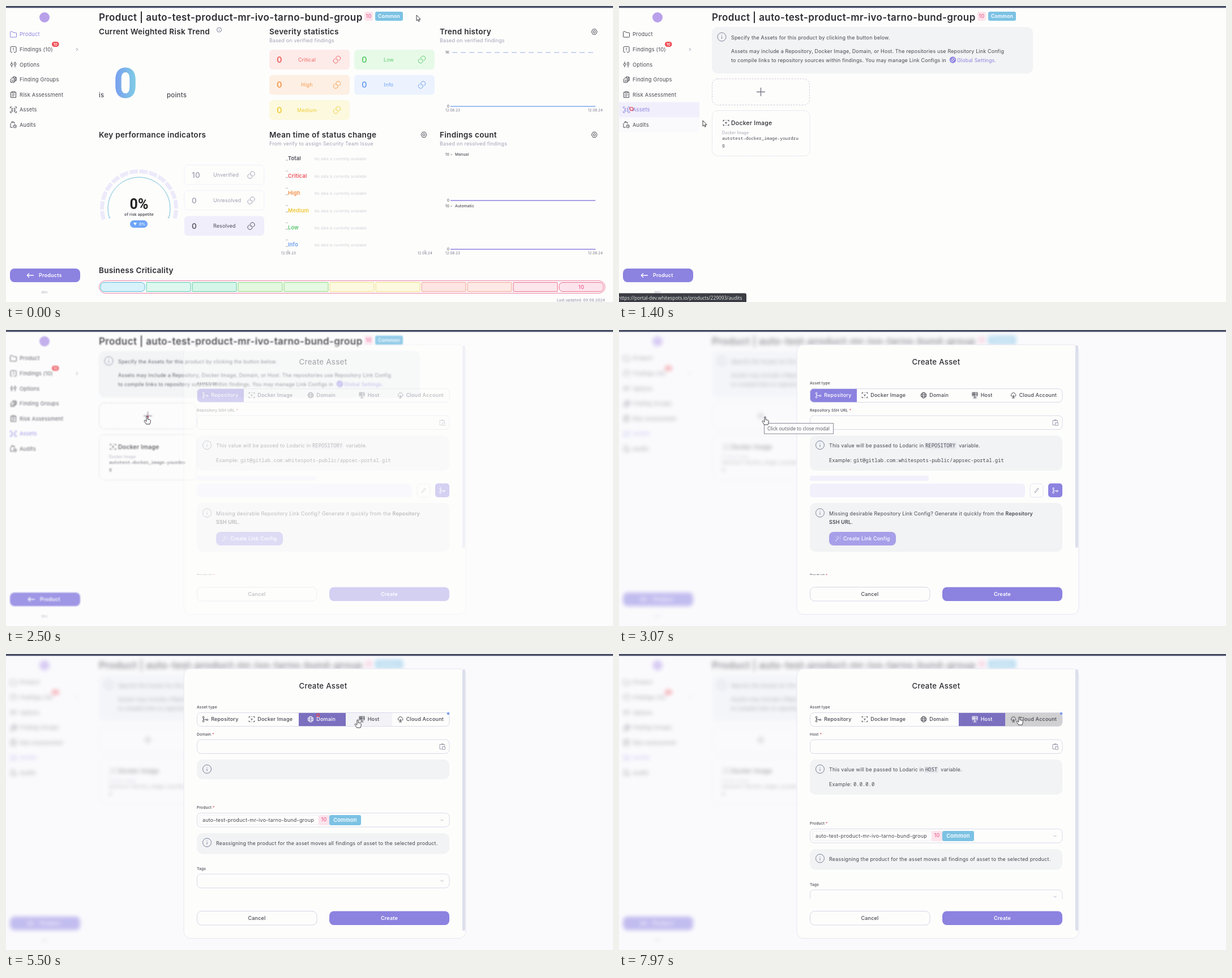
An HTML page that plays this animation: 1072 by 522 pixels, repeating every 8 s.

```html
<!DOCTYPE html>
<html lang="en">
<head>
<meta charset="utf-8">
<title>Create asset</title>
<style>
html, body { margin: 0; width: 100%; height: 100%; overflow: hidden; background: #fdfdfc; }
svg { display: block; }
text { font-family: Inter, sans-serif; letter-spacing: .023em; }
.mono { font-family: "Noto Sans Mono", monospace; letter-spacing: 0; }
.sys { font-family: "Open Sans", sans-serif; letter-spacing: 0; }
.num { font-family: Roboto, sans-serif; letter-spacing: 0; }
</style>
</head>
<body>
<svg id="stage" width="1072" height="522" viewBox="0 0 1072 522"></svg>
<script>
const PURPLE = '#8c82e0', DEEP = '#7a70bf', INK = '#484852', DARK = '#2c2c32', MUTED = '#a2a2b6', PANEL = '#f1f3f4';
const PRODUCT = 'auto-test-product-mr-ivo-tarno-bund-group';

// y is the middle of the capitals
function text(x, y, str, size, { fill = INK, weight = 400, anchor = 'start', cls = '' } = {}) {
  return `<text x="${x}" y="${y + size * 0.36}" font-size="${size}" font-weight="${weight}" text-anchor="${anchor}" class="${cls}" fill="${fill}">${str}</text>`;
}
function box(x, y, w, h, r, fill = 'none', stroke = 'none', extra = '') {
  return `<rect x="${x}" y="${y}" width="${w}" height="${h}" rx="${r}" fill="${fill}" stroke="${stroke}" ${extra}/>`;
}
function line(x1, y1, x2, y2, stroke, width = 1, extra = '') {
  return `<path d="M${x1} ${y1}L${x2} ${y2}" fill="none" stroke="${stroke}" stroke-width="${width}" ${extra}/>`;
}
const dot = (x, y, r, fill) => `<circle cx="${x}" cy="${y}" r="${r}" fill="${fill}"/>`;
const mid = (x, y, str, size, o = {}) => text(x, y, str, size, { ...o, anchor: 'middle' });
const heading = (x, y, str) => text(x, y, str, 13.5, { weight: 600, fill: DARK });
const sub = (x, y, str) => text(x, y, str, 8.9, { fill: MUTED });
const body = (x, y, str, o) => text(x, y, str, 8.9, o);
const group = (id, inner, extra = '') => `<g id="${id}" ${extra}>${inner}</g>`;

const ICONS = {
  folder: 'M-5.5-3.5V4Q-5.5 5-4.5 5H4.5Q5.5 5 5.5 4V-2Q5.5-3 4.5-3H0L-1.8-5H-4.5Q-5.5-5-5.5-3.5Z',
  alert: 'M-2 5H-3.5Q-5 5-5 3.5V-3.5Q-5-5-3.5-5H3.5Q5-5 5-3.5V3.5Q5 5 3.5 5H1M0-2.8V1M0 2.6V3.4',
  sliders: 'M-3-5V-2M-3 2V5M3-5V-3M3 1V5M-4.8 0a1.8 2 0 1 0 3.6 0a1.8 2 0 1 0-3.6 0M1.2-1a1.8 2 0 1 0 3.6 0a1.8 2 0 1 0-3.6 0',
  stack: 'M-2.5-3H1.5V5H-4.5V-.8ZM-.5-3V-5H3.5V3H1.5M3.5-4H5.3V1.5H3.5M-2.5 1H0M-2.5 3H0',
  clip: 'M-2-4.5H-4.5V5H4.5V-4.5H2M-2-5.5H2V-3H-2ZM-2.5 0H2.5M-2.5 2.5H1',
  scan: 'M-5.5-2.5V-5H-2.5M2.5-5H5.5V-2.5M5.5 2.5V5H2.5M-2.5 5H-5.5V2.5M-3.4-1.6a1.1 1.1 0 1 0 2.2 0a1.1 1.1 0 1 0-2.2 0M1.2-1.6a1.1 1.1 0 1 0 2.2 0a1.1 1.1 0 1 0-2.2 0M-3.4 2a1.1 1.1 0 1 0 2.2 0a1.1 1.1 0 1 0-2.2 0M1.2 2a1.1 1.1 0 1 0 2.2 0a1.1 1.1 0 1 0-2.2 0',
  audit: 'M-1 4.5H-5V-2L-2.5-4.5H2V-2M-3-4.5V-5.5H0M0 2.5a2.7 2.7 0 1 0 5.4 0a2.7 2.7 0 1 0-5.4 0M2.7 1V2.7H4',
  branch: 'M-4.8-3.5a1.4 1.4 0 1 0 2.8 0a1.4 1.4 0 1 0-2.8 0M-4.8 3.5a1.4 1.4 0 1 0 2.8 0a1.4 1.4 0 1 0-2.8 0M2 1a1.4 1.4 0 1 0 2.8 0a1.4 1.4 0 1 0-2.8 0M-3.4-2V2M-3.2-1Q-2.5 1 2 1',
  cube: 'M-4.8-2.4V-4.5H-2.7M2.7-4.5H4.8V-2.4M4.8 2.4V4.5H2.7M-2.7 4.5H-4.8V2.4M-1.6-1L0 0L1.6-1M0 0V2M0-4.8V-4M0 4V4.8',
  globe: 'M-4.8 0a4.8 4.8 0 1 0 9.6 0a4.8 4.8 0 1 0-9.6 0M-2.2 0a2.2 4.8 0 1 0 4.4 0a2.2 4.8 0 1 0-4.4 0M-4.8-1.6H4.8M-4.8 1.6H4.8',
  server: 'M-4.5-4.8H4.5V-1.8H-4.5ZM-4.5-1.8H4.5V1.2H-4.5ZM0 1.2V4.8M-3 4.8H3M-2.8-3.3H0M-2.8-.3H0',
  cloud: 'M-3 2A2.4 2.4 0 0 1-3-2A3.2 3.2 0 0 1 3.2-2A2.2 2.2 0 0 1 3 2ZM0 0V4.8M-2.5 4.8H2.5',
  paste: 'M-1 4H-4.5V-4H4V-1M-1.8-5H1.8M0 0H4.8V4.8H0Z',
  pencil: 'M-3 4L-2.4 1.4L2-4.2L3.6-3L-.8 2.6Z',
  wand: 'M-4.5 4.5L2-2M0-4.5V-2.5M3.5 0H5M3.5-3.5L4.8-4.8M-3.5-2.5L-2.5-1.5',
  gear: 'M-2.4-4.6H2.4L5 0L2.4 4.6H-2.4L-5 0ZM-2 0a2 2 0 1 0 4 0a2 2 0 1 0-4 0',
  link: 'M-.2 1A4 4 0 1 1 3.4 1.6M.2-1A4 4 0 1 1-3.4-1.6',
  back: 'M6 0H-5.5M-2-3.8L-5.8 0L-2 3.8',
  plus: 'M-7.5 0H7.5M0-7.5V7.5',
  down: 'M-2.5-1L0 1L2.5-1',
  right: 'M-1-2.5L1.5 0L-1 2.5'
};
function icon(name, x, y, color = INK, width = 1) {
  return `<path d="${ICONS[name]}" transform="translate(${x} ${y})" fill="none" stroke="${color}" stroke-width="${width}" stroke-linejoin="round"/>`;
}
function info(x, y, r = 7.5) {
  return `<circle cx="${x}" cy="${y}" r="${r}" fill="none" stroke="#7b7f9b"/>` +
    line(x, y - r * 0.1, x, y + r * 0.45, '#7b7f9b') + dot(x, y - r * 0.4, r / 12, '#7b7f9b');
}
function tags(x, y, joined) {
  const [w, cw, h, size] = joined ? [19, 56, 18, 9.2] : [15, 49, 16, 8.7];
  return box(x, y, w, h, 3, '#fde3ec') + mid(x + w / 2, y + 8, '10', 9, { fill: '#e6477d' }) +
    box(x + 19, y, cw, h, 3, '#7cc2e4') +
    mid(x + 19 + cw / 2, y + 8.2, 'Common', size, { fill: '#fff', weight: 600 });
}

// Shared page frame
function frame(active, back, backX) {
  const rows = [['Product', 'folder'], ['Findings (10)', 'alert'], ['Options', 'sliders'], ['Finding Groups', 'stack'],
    ['Risk Assessment', 'clip'], ['Assets', 'scan'], ['Audits', 'audit']];
  const menu = rows.map(([name, ic], i) => {
    const y = 50 + i * 26.6, c = name === active ? PURPLE : INK;
    return icon(ic, 13, y, c) + text(24, y, name, 9.25, { fill: c });
  }).join('');
  return dot(68, 20, 9, '#b9a0ea') + menu +
    box(81, 63, 12.5, 9, 4.5, '#ee4950') + mid(87.3, 67.5, '10', 6.5, { fill: '#fff', weight: 600 }) +
    icon('right', 125, 76.6, '#88889a') + box(7, 463, 124, 24, 8, PURPLE) + icon('back', backX - 15, 475, '#fff', 1.3) +
    text(backX, 475, back, 9, { fill: '#fff', weight: 600 }) + mid(68, 505, 'dev', 6.5, { fill: '#b4b4c2' }) +
    text(164, 19.5, 'Product | ' + PRODUCT, 17, { weight: 600, fill: DARK }) + tags(633, 10, false);
}

function severity() {
  const cards = [['Critical', '#fdebe9', '#f0605e'], ['High', '#fdefe3', '#f59a4e'], ['Medium', '#fcf9de', '#efcd3a'],
    ['Low', '#e7fae8', '#58cc6a'], ['Info', '#ecf3fe', '#6f9ff0']];
  return cards.map(([name, bg, c], i) => {
    const x = i < 3 ? 465 : 615, y = 77 + (i % 3) * 44.5;
    return box(x, y, 142, 35, 6, bg) + text(x + 13, y + 17.5, '0', 14.5, { fill: c, weight: 600 }) +
      mid(x + (i < 3 ? 66.5 : 61), y + 17.5, name, 8.9, { fill: c }) + icon('link', x + 119.5, y + 17.5, c);
  }).join('');
}
function gauge() {
  const arc = (r, deg) => {
    const dx = r * Math.cos(deg * Math.PI / 180), dy = r * Math.sin(deg * Math.PI / 180);
    return `M${235 - dx} ${357 + dy}A${r} ${r} 0 1 1 ${235 + dx} ${357 + dy}`;
  };
  return `<path d="${arc(65.5, 17)}" fill="none" stroke="#eceafa" stroke-width="7" stroke-dasharray="14.9 2.6"/>` +
    `<path d="M184.500 372.500${arc(55, 18).replace('M', 'L')}L285.500 372.500" fill="none" stroke="#72bfd9"/>` +
    mid(235, 349, '0%', 25, { cls: 'num', weight: 700, fill: '#222' }) +
    mid(235, 368, 'of risk appetite', 6.8, { weight: 600 }) + box(219, 378, 31, 13, 6.5, '#6ea5f7') +
    '<path d="M225 382h6l-3 5z" fill="#fff"/>' + text(235, 384.5, '0%', 6.8, { fill: '#fff', weight: 500 });
}
function indicators() {
  return [['10', 'Unverified'], ['0', 'Unresolved'], ['0', 'Resolved']].map(([n, name], i) => {
    const y = 280.5 + i * 45, last = i === 2, c = last ? INK : '#9c9cb0';
    return box(315, y, 141, 34.5, 6, last ? '#f0eefb' : 'none', last ? 'none' : '#f1eff9') +
      text(328, y + 17.5, n, 13.5, { fill: c, weight: 500 }) + text(366, y + 17.5, name, 8.8, { fill: c }) +
      icon('link', 433, y + 17.5, c);
  }).join('');
}
const dates = (x1, x2, y) => mid(x1, y, '12.08.23', 6.2, { fill: '#77778a' }) + mid(x2, y, '12.08.24', 6.2, { fill: '#77778a' });
function meanTime() {
  const rows = [['Total', INK], ['Critical', '#ee4f5a'], ['High', '#f08a3c'], ['Medium', '#efc531'], ['Low', '#55c568'], ['Info', '#669af0']];
  return rows.map(([name, c], i) => {
    const y = 269 + i * 30.4;
    return line(494, y + 3, 498, y + 3, '#aaa') + (i < 5 ? line(494, y + 22, 498, y + 22, '#bbb') : '') +
      text(498, y, name, 9.2, { fill: c, weight: 600 }) +
      text(545, y + 1, 'No data is currently available', 6.4, { fill: '#cfcfd6' });
  }).join('') + line(498, 430, 498, 433, '#aaa') + line(740, 430, 740, 433, '#aaa') + dates(499, 740, 436);
}
function counts(y, base, name) {
  return text(776, y, '10', 6.2) + line(785, y, 788, y, '#888') + text(793, y, name, 6.7, { weight: 500 }) +
    text(779, base, '0', 6.2) + line(785, base, 1041, base, PURPLE, 1.6);
}
function criticality() {
  const fills = ['#d8f2fb', '#def8ef', '#d6f6ea', '#e3f8df', '#e6f9e2', '#fcf9e0', '#fcf9e0', '#fce5e2', '#fde9e5', '#fde6ec', '#fde4ec'];
  const edges = ['#58b8d8', '#58c8b0', '#58c8a0', '#8bd87c', '#8bd87c', '#f0dc80', '#f0dc80', '#f2a090', '#f2a090', '#ee6a8a', '#ee6a8a'];
  return box(164.5, 484.5, 893.5, 22, 11, 'none', '#ec80a4') +
    fills.map((f, i) => box(167 + i * 81, 487.5, 78, 16, i % 10 ? 1 : 6, f, edges[i])).join('') +
    mid(1016, 495.5, '10', 9.5, { fill: '#e6477d' });
}
const dashboard = frame('Product', 'Products', 58) +
  heading(164, 45.5, 'Current Weighted Risk Trend') + info(376.5, 42, 4) +
  text(164, 157, 'is', 11.2, { weight: 500 }) + text(284, 157, 'points', 11.4, { weight: 500 }) +
  mid(211, 135, '0', 74, { cls: 'num', weight: 700, fill: 'url(#zero)' }) +
  heading(465, 45.5, 'Severity statistics') + sub(465, 61, 'Based on verified findings') + severity() +
  heading(766, 45.5, 'Trend history') + sub(766, 61, 'Based on verified findings') + icon('gear', 1039, 45.5) +
  text(776, 82, '1K', 6.2) + line(788, 82, 1041, 82, '#9aaee6', 1.2, 'stroke-dasharray="9 6"') +
  text(779, 177, '0', 6.2) + line(785, 177, 1041, 177, '#7fa8ec', 1.6) + dates(789, 1041, 184) +
  heading(164, 227.5, 'Key performance indicators') + gauge() + indicators() +
  heading(465, 227.5, 'Mean time of status change') + sub(465, 242.5, 'From verify to assign Security Team Issue') +
  icon('gear', 738, 227) + meanTime() +
  heading(766, 227.5, 'Findings count') + sub(766, 242.5, 'Based on resolved findings') + icon('gear', 1039, 227) +
  counts(262, 343, 'Manual') + counts(353, 429, 'Automatic') + dates(789, 1041, 436) +
  heading(164, 466.5, 'Business Criticality') + criticality() +
  text(1058, 519, 'Last updated: 09.08.2024', 6.5, { weight: 600, anchor: 'end', fill: MUTED });

const assets = frame('Assets', 'Product', 60) + box(164, 37, 567, 82, 10, PANEL) + info(181.5, 54.5) +
  body(198, 55.5, 'Specify the Assets for this product by clicking the button below.') +
  body(198, 79.5, 'Assets may include a Repository, Docker Image, Domain, or Host. The repositories use Repository Link Config') +
  body(198, 95.5, 'to compile links to repository sources within findings. You may manage Link Configs in') +
  dot(589.5, 95, 5.7, PURPLE) + `<g transform="translate(589.5 95) scale(.5)">${icon('link', 0, 0, '#fff', 1.6)}</g>` +
  body(597, 95.5, 'Global Settings.', { fill: PURPLE }) +
  box(164.5, 128.5, 172, 46, 10, 'none', '#cfcfda', 'id="add" stroke-dasharray="3 2"') + icon('plus', 250.5, 151.5, '#777784', 1.4) +
  box(164.5, 184.5, 172.5, 80, 10, 'none', '#dfdfe8', 'stroke-dasharray="2 1"') +
  icon('cube', 189, 206, INK, 1.2) + text(198, 206, 'Docker Image', 10.5, { weight: 500, fill: DARK }) +
  text(182, 223.5, 'Docker Image', 6.9, { fill: MUTED }) +
  text(182, 233.5, 'autotest-docker_image-yourdru', 7.76, { cls: 'mono' }) + text(182, 245, 'g', 7.76, { cls: 'mono' });

// Dialog
const TABS = [
  { name: 'Repository', ic: 'branch', x: 337, field: 'Repository SSH URL', code: 'REPOSITORY', sample: 'git@gitlab.com:whitespots-public/appsec-portal.git' },
  { name: 'Docker Image', ic: 'cube', x: 420, code: 'DOCKER_IMAGE', sample: 'nginx:latest' },
  { name: 'Domain', ic: 'globe', x: 517, code: 'DOMAIN', sample: 'example.com' },
  { name: 'Host', ic: 'server', x: 600, code: 'HOST', sample: '0.0.0.0' },
  { name: 'Cloud Account', ic: 'cloud', x: 682 }
];
const ICON_X = [352, 434, 538, 628.5, 696.5];
const tabEnd = i => i < 4 ? TABS[i + 1].x : 783;
const label = (y, str) => text(337, y, str, 6.7, { weight: 500 });
const required = (y, str) => label(y, str + '<tspan fill="#e5484d"> *</tspan>');
const field = y => box(337.5, y, 445.5, 24.5, 7, '#fdfdfc', '#d9d9ea');

function form(i) {
  const tab = TABS[i], after = 541 + tab.code.length * 5.32;
  const bar = TABS.map((t, k) => {
    const c = k === i ? '#fff' : INK;
    return icon(t.ic, ICON_X[k], 115, c) + text(ICON_X[k] + 10.2, 115, t.name, 9, { fill: c, weight: 500 });
  }).join('');
  return box(tab.x, 103, tabEnd(i) - tab.x, 24.5, 0, i ? DEEP : PURPLE, 'none', 'clip-path="url(#bar)"') + bar +
    required(141.5, tab.field || tab.name) +
    group('note' + i, body(371, 204, 'This value will be passed to Lodaric in') +
      box(539, 198, after - 537, 12, 2, '#e6e8ed') + text(541, 204, tab.code, 8.87, { cls: 'mono' }) +
      body(after + 6, 204, 'variable.') + body(371, 230, 'Example:') + text(414, 230, tab.sample, 8.87, { cls: 'mono' }));
}
const linkConfig = box(337, 257, 210, 9, 4, '#f1f0fb') + box(337, 271, 380, 24, 6, '#f1f0fb') +
  box(726, 271, 23, 24, 6, 'none', '#e4e3ee') + icon('pencil', 737.5, 283, '#a5a5b5') +
  box(758, 270.5, 25, 24.5, 5, PURPLE) + icon('branch', 770.5, 283, '#fff') +
  box(337, 305, 446, 86, 10, PANEL) + info(355, 322.5) +
  body(371, 323.5, 'Missing desirable Repository Link Config? Generate it quickly from the <tspan font-weight="600">Repository</tspan>') +
  body(371, 339, '<tspan font-weight="600">SSH URL</tspan>.') +
  box(371, 356, 118, 24, 8, '#a79fe9') + icon('wand', 386.5, 368, '#fff') + text(396, 368, 'Create Link Config', 8.9, { fill: '#fff', weight: 500 });
const lower = required(271, 'Product') + field(280.5) + box(342, 284, 210, 17, 3, 'none', '#eeeef4') +
  text(347, 293, PRODUCT, 9) + tags(552, 284, true) + icon('down', 770, 293, '#b4b4c4') +
  box(337, 316, 446, 36.5, 10, PANEL) + info(355, 332.5) +
  body(371, 333.5, 'Reassigning the product for the asset moves all findings of asset to the selected product.') +
  label(378.5, 'Tags') + field(388) + icon('down', 770, 400, '#b4b4c4');
const dialog = box(314, 26, 498, 475.5, 12, '#fdfdfc', '#e6e6f0') + box(806, 27, 5, 461, 2.5, '#dcdfec', 'none', 'id="scroll"') +
  mid(560, 56.5, 'Create Asset', 13.2, { weight: 500, fill: DARK }) + label(94, 'Asset type') +
  box(0, 103, 0, 24.5, 0, '#f3f3f6', 'none', 'id="hover" clip-path="url(#bar)"') +
  field(151) + icon('paste', 770.5, 163.5, '#9a9aae') + box(337, 186, 446, 62, 10, PANEL, 'none', 'id="note"') + info(355, 203) +
  [0, 1, 2, 3].map(i => group('form' + i, form(i))).join('') + box(337.5, 103.5, 445.5, 24, 7, 'none', '#d9d9ea') +
  group('badge', dot(781, 105, 2.3, '#7d9df0')) + group('links', linkConfig) +
  `<g clip-path="url(#view)">${group('lower', lower)}</g>` +
  box(337.5, 453.5, 211.5, 24.5, 8, 'none', '#d5d5e6') + mid(443, 466, 'Cancel', 9, { weight: 500 }) +
  box(571, 453.5, 212, 24.5, 8, PURPLE) + mid(677, 466, 'Create', 9, { weight: 600, fill: '#fff' });

const stage = document.getElementById('stage');
stage.innerHTML = `<defs>
  <linearGradient id="zero"><stop offset="0" stop-color="#789bf0"/><stop offset="1" stop-color="#7fd0e4"/></linearGradient>
  <clipPath id="bar"><rect x="337" y="103" width="446" height="24.500" rx="7"/></clipPath>
  <clipPath id="view"><rect x="314" y="180" width="490" height="252"/></clipPath></defs>` +
  box(0, 0, 1072, 522, 0, '#fdfdfc') +
  group('page', box(0, 169.5, 142, 26.5, 0, '#efeefb', 'none', 'id="rowA"') + box(0, 196, 142, 26.5, 0, '#fafafc', 'none', 'id="rowB"') +
    group('dash', dashboard) + group('assets', assets)) +
  box(0, 0, 1072, 522, 0, '#f8f7fd', 'none', 'id="veil"') + group('dialog', dialog) + box(0, 0, 1072, 3.3, 0, '#474d66') +
  group('status', box(-4, 506.5, 229, 20, 3, '#3a3d43') + text(-1.5, 514.5, '', 8.4, { cls: 'sys', fill: '#ececee' })) +
  group('tip', box(256.5, 164.5, 122, 18.5, 0, '#fdfdfd', '#8a8a98') + text(262, 173.7, 'Click outside to close modal', 8.5, { cls: 'sys', fill: '#55555f' })) +
  '<circle id="ring" fill="#e0526a" fill-opacity=".15" stroke="#e0485e" stroke-width="1.200"/>' +
  group('cursor', '<path id="arrow" d="M0 0V10L2.300 8L3.800 11.300L5.300 10.600L3.900 7.400H7Z"/>' +
    '<path id="hand" d="M-1.100 1a1.100 1.100 0 0 1 2.200 0V5.200l3.600.8c1 .3 1.600.9 1.600 2 0 3-.9 3.600-1.200 6H-1.600C-2 12-4.600 10-5 8.200c0-1 1.200-1.400 2-.7l1.900 1.800z"/>',
    'fill="#fff" stroke="#26262c" stroke-width=".9" stroke-linejoin="round"');
const el = {};
stage.querySelectorAll('[id]').forEach(n => el[n.id] = n);

// Time, x, y of the pointer tip
const PATH = [[0, 725, 16], [100, 725, 16], [850, 22, 180], [1120, 22, 181], [1400, 148, 202], [1950, 249, 152], [2550, 249, 152],
  [2900, 258, 153], [3400, 258, 153], [4000, 456, 108], [4170, 457, 109], [4650, 457, 109], [5060, 551, 108], [5230, 551, 108],
  [5500, 621, 116], [5850, 640, 110], [7100, 640, 110], [7700, 707, 111], [8000, 707, 111]];
const CLICKS = [[1090, 22, 181.5], [2090, 250, 153], [4140, 456, 108], [5160, 551, 108], [6200, 640, 110]];
const PICKS = [[0, 0], [4140, 4560], [5160, 5650], [6200, 6650]]; // tab chosen, note opens

const ramp = (t, a, b) => Math.min(1, Math.max(0, (t - a) / (b - a)));
const ease = k => k * k * (3 - 2 * k);
const show = (n, on) => { n.style.display = on ? '' : 'none'; };
const set = (n, attrs) => { for (const k in attrs) n.setAttribute(k, attrs[k]); };

function pointer(t) {
  const i = Math.max(1, PATH.findIndex(p => p[0] > t));
  const [a, b] = [PATH[i - 1], PATH[i]], k = ease(ramp(t, a[0], b[0]));
  return [a[1] + (b[1] - a[1]) * k, a[2] + (b[2] - a[2]) * k];
}

function render(t) {
  const [x, y] = pointer(t), open = ease(ramp(t, 2420, 2620));
  show(el.dash, t < 1120);
  show(el.assets, t >= 1120);
  el.rowA.style.opacity = ramp(t, 760, 880) * (1 - ramp(t, 1380, 1650));
  el.rowB.style.opacity = ramp(t, 1220, 1300) * (1 - ramp(t, 1380, 1600));
  show(el.status, t >= 820 && t < 1620);
  el.status.querySelector('text').textContent = 'https://portal-dev.whitespots.io/products/229093/' + (t < 1220 ? 'assets' : 'audits');
  set(el.add, { fill: t > 2050 && t < 2480 ? '#d2d2d4' : 'none' });

  el.page.style.filter = open ? `blur(${3.6 * open}px)` : 'none';
  el.veil.style.opacity = open * 0.5;
  el.dialog.style.opacity = open;
  show(el.dialog, open > 0);
  show(el.tip, t >= 2950 && t < 3420);

  const pick = PICKS.filter(p => t >= p[0]).length - 1;
  const grow = pick ? ease(ramp(t, PICKS[pick][1], PICKS[pick][1] + 200)) : 1;
  for (let i = 0; i < 4; i++) show(el['form' + i], i === pick);
  el['note' + pick].style.opacity = grow;
  set(el.note, { height: 35 + 27 * grow });
  set(el.lower, { transform: `translate(0 ${pick ? 28 * grow : 162})` });
  set(el.scroll, { height: pick ? 461 : 357 });
  show(el.links, pick === 0);
  show(el.badge, t >= 4400);

  const inBar = y > 103 && y < 128 && x > 337 && x < 783;
  const over = inBar ? TABS.findLastIndex(tab => x >= tab.x) : -1;
  show(el.hover, over >= 0);
  if (over >= 0) {
    const pressed = t > 7880 || CLICKS.some(c => t > c[0] - 90 && t < c[0]);
    set(el.hover, { x: TABS[over].x, width: tabEnd(over) - TABS[over].x, fill: pressed ? '#d0d0d2' : '#f3f3f7' });
  }

  const click = CLICKS.find(c => t >= c[0] && t < c[0] + 500);
  show(el.ring, click);
  if (click) set(el.ring, { cx: click[1], cy: click[2], r: 8 * (1 - (t - click[0]) / 500) });

  const onAdd = x > 164 && x < 337 && y > 128 && y < 175;
  const hand = open ? x < 314 || inBar : x < 142 || (t > 1120 && onAdd);
  show(el.hand, hand);
  show(el.arrow, !hand);
  set(el.cursor, { transform: `translate(${x} ${y})` });
}

const start = performance.now();
function tick() {
  render((performance.now() - start) % 8000);
  requestAnimationFrame(tick);
}
tick();
</script>
</body>
</html>
```
